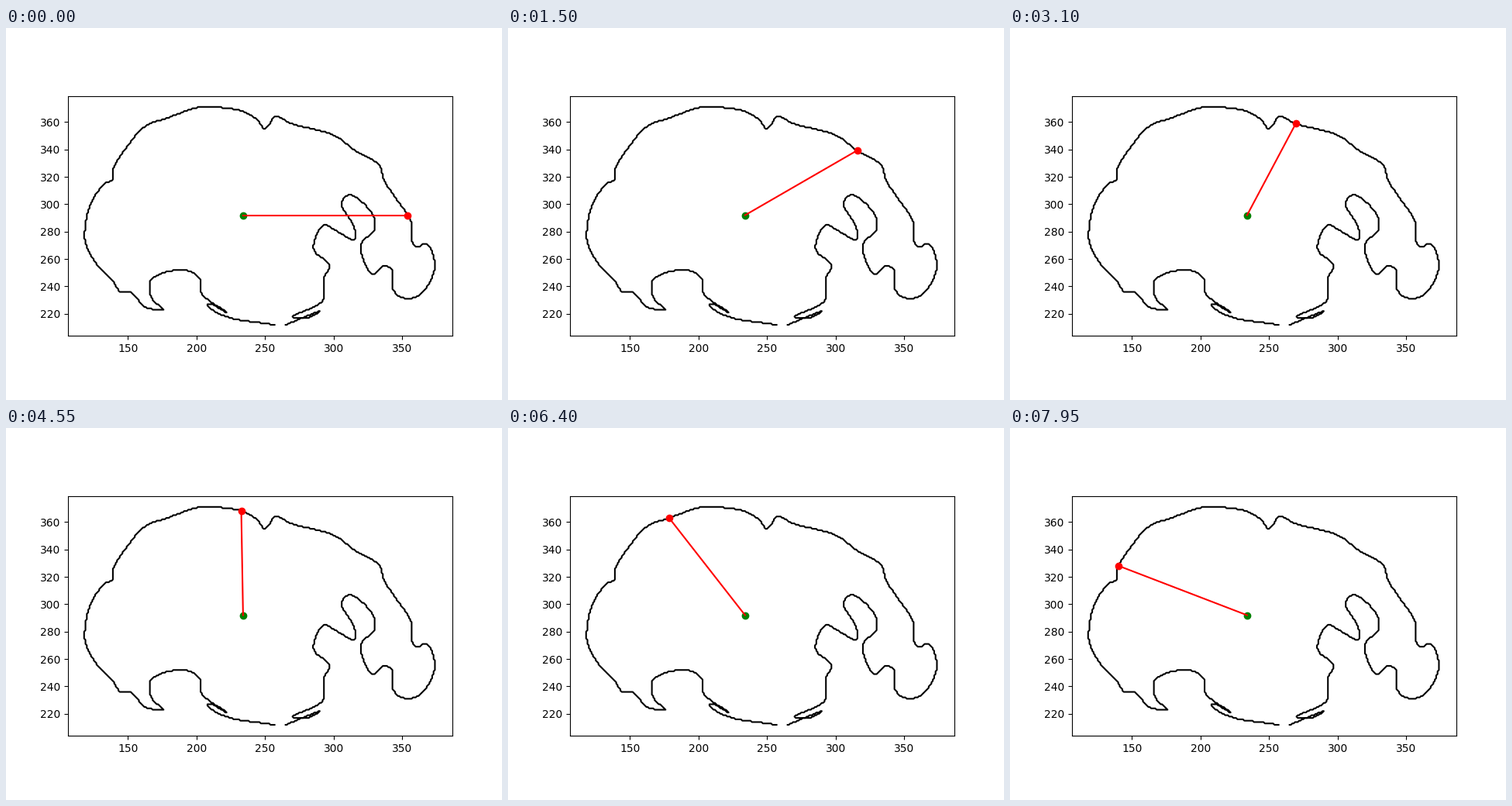
Write a matplotlib script that moves like this. It is 640 px wide and 480 px high and loops after 8 s.

```python
import numpy as np
import matplotlib.pyplot as plt
from matplotlib.animation import FuncAnimation

FRAMES, STEP_MS = 160, 50
CENTER = np.array([234, 292])

# Key points of the outline, clockwise from the gap at the bottom.
KEYS = np.array([
    (257, 212), (225, 217), (213, 222), (208, 226), (211, 227), (222, 221),
    (206, 232), (203, 237), (203, 245), (191, 252), (167, 245), (167, 232),
    (176, 223), (163, 225), (152, 236), (145, 236), (139, 244), (126, 258),
    (119, 272), (119, 285), (123, 301), (133, 315), (139, 318), (139, 325),
    (150, 343), (163, 357), (179, 363), (203, 371), (213, 371), (233, 368),
    (244, 362), (250, 355), (258, 364), (269, 359), (301, 350), (316, 339),
    (333, 329), (337, 317), (345, 305), (357, 286), (357, 273), (361, 269),
    (368, 271), (374, 254), (362, 233), (350, 232), (343, 238), (343, 251),
    (337, 255), (329, 249), (325, 253), (320, 271), (330, 281), (328, 293),
    (311, 307), (306, 300), (315, 283), (315, 274), (301, 281), (293, 285),
    (286, 273), (286, 266), (297, 256), (293, 246), (293, 232), (289, 227),
    (270, 218), (281, 217), (290, 222), (265, 212),
])


def spline(points, samples=60):
    """Smooth curve through the points, spaced by root of chord length."""
    chord = np.linalg.norm(np.diff(points, axis=0), axis=1)
    knots = np.concatenate([[0], np.cumsum(np.sqrt(chord))])
    slope = np.gradient(points.astype(float), knots, axis=0)
    s = np.linspace(0, knots[-1], samples * len(points))
    i = np.clip(np.searchsorted(knots, s, side="right") - 1, 0, len(points) - 2)
    h = (knots[i + 1] - knots[i])[:, None]
    u = (s - knots[i])[:, None] / h
    return ((1 + 2 * u) * (1 - u) ** 2 * points[i]
            + u * (1 - u) ** 2 * h * slope[i]
            + u ** 2 * (3 - 2 * u) * points[i + 1]
            + u ** 2 * (u - 1) * h * slope[i + 1])


def pixel_path(curve):
    """Follow the curve in whole-unit steps, as a traced image edge does."""
    step = np.abs(np.diff(curve, axis=0)).max(axis=1)
    dist = np.concatenate([[0], np.cumsum(step)])
    t = np.linspace(0, dist[-1], round(dist[-1]) + 1)
    return np.round(np.column_stack([np.interp(t, dist, c) for c in curve.T]))


outline = pixel_path(spline(KEYS))

# Radius of the back as a function of the angle seen from the center.
back = outline[outline[:, 0].argmin():outline[:, 0].argmax()]
dx, dy = (back[back[:, 1] >= CENTER[1]] - CENTER)[::-1].T
angles, radii = np.arctan2(dy, dx), np.hypot(dx, dy)

fig, ax = plt.subplots(figsize=(6.4, 4.8), dpi=100)
ax.set_aspect("equal")
ax.set_xlim(106.25, 386.75)
ax.set_ylim(204.05, 378.95)
ax.plot(outline[:, 0], outline[:, 1], color="black")
ax.plot(*CENTER, "o", color="green")
ray, = ax.plot([], [], color="red")
tip, = ax.plot([], [], "o", color="red")


def update(degree):
    a = np.radians(degree)
    r = np.interp(a, angles, radii)
    x, y = CENTER + r * np.array([np.cos(a), np.sin(a)])
    ray.set_data([CENTER[0], x], [CENTER[1], y])
    tip.set_data([x], [y])
    return ray, tip


anim = FuncAnimation(fig, update, frames=FRAMES, interval=STEP_MS,
                     repeat=True, repeat_delay=0)
plt.show()
```
